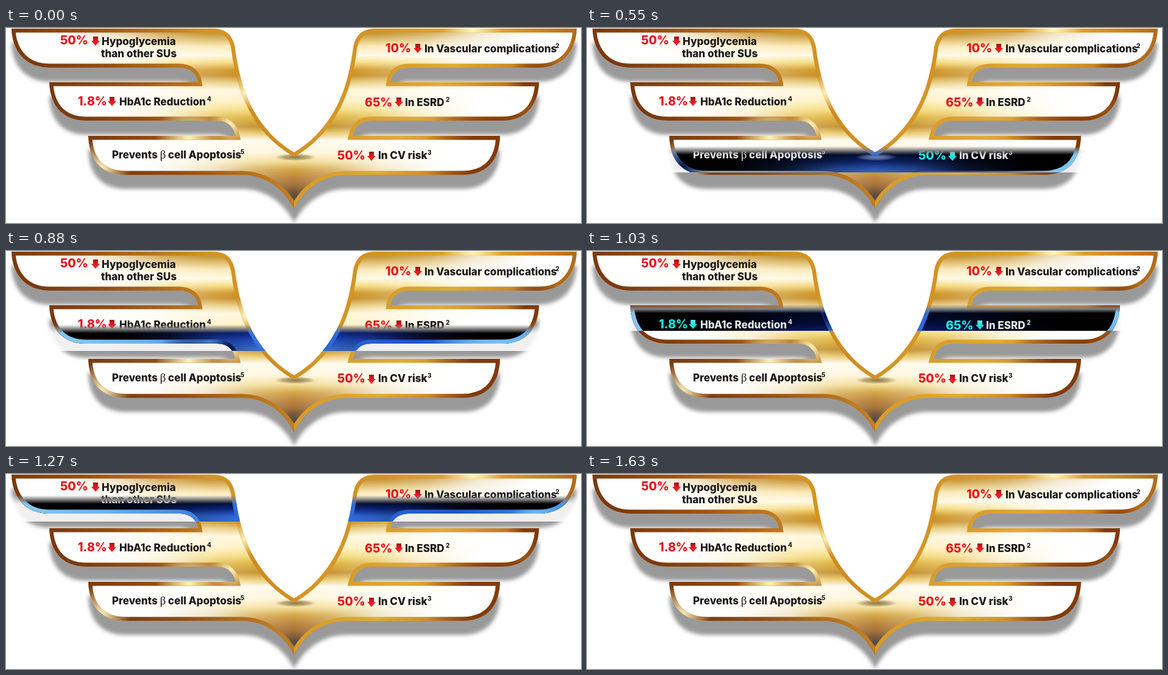
An HTML page that plays this animation: 944x320 px, repeating every 4.81 s.

```html
<!DOCTYPE html>
<html lang="en">
<head>
<meta charset="utf-8">
<title>Gold wings</title>
<style>
  html, body { margin: 0; width: 100%; height: 100%; overflow: hidden; background: #fff; }
  svg { position: absolute; left: 0; top: 0; }
  text { font: 800 17px Inter, sans-serif; fill: #1a1718; }
  .num { font-size: 19.5px; fill: #e8141c; }
  .sup { font-size: 10px; }
  .beta { font: 400 19px "Liberation Serif", serif; }
  #band {
    position: absolute; left: 0; top: 0; width: 944px; height: 320px; background: #fff;
    mask: linear-gradient(transparent, #000 14px) 0 -100px / 100% 43px no-repeat;
  }
  #band svg { filter: invert(1); }
</style>
</head>
<body>
<svg width="944" height="320">
  <defs>
    <path id="half" d="M473 297C457 264 426 241 386 241H197C152 241 136 212 135 177H377C374 164 366 152 346 152H132C88 152 72 122 71 89H315C313 75 303 65 283 65H72C28 65 10 34 9 1H338C362 1 372 12 376 32C384 100 408 165 473 204"/>
    <path id="arrow" d="M3 0H11V7H14L7 15L0 7H3Z" fill="url(#red)"/>
    <clipPath id="inside"><use href="#half"/></clipPath>

    <linearGradient id="red" x2="0" y2="1">
      <stop stop-color="#9c1218"/><stop offset=".6" stop-color="#ee1c24"/>
    </linearGradient>
    <linearGradient id="gold" gradientUnits="userSpaceOnUse" x1="0" y1="0" x2="0" y2="300">
      <stop offset=".03" stop-color="#c69634"/>
      <stop offset=".1" stop-color="#fbeab8"/>
      <stop offset=".15" stop-color="#fffae8"/>
      <stop offset=".19" stop-color="#f6dc85"/>
      <stop offset=".23" stop-color="#d19a2c"/>
      <stop offset=".26" stop-color="#c8902c"/>
      <stop offset=".3" stop-color="#ead083"/>
      <stop offset=".34" stop-color="#fff7de"/>
      <stop offset=".4" stop-color="#fff1c4"/>
      <stop offset=".45" stop-color="#f3da78"/>
      <stop offset=".49" stop-color="#dcb036"/>
      <stop offset=".54" stop-color="#c08b26"/>
      <stop offset=".575" stop-color="#e8c564"/>
      <stop offset=".615" stop-color="#fffaec"/>
      <stop offset=".68" stop-color="#fff6dc"/>
      <stop offset=".73" stop-color="#f3dc94"/>
      <stop offset=".775" stop-color="#cf9f3a"/>
      <stop offset=".82" stop-color="#b5772a"/>
      <stop offset=".86" stop-color="#955e20"/>
      <stop offset=".89" stop-color="#6a4018"/>
      <stop offset=".92" stop-color="#332a22"/>
    </linearGradient>
    <linearGradient id="pale" gradientUnits="userSpaceOnUse" x1="9" y1="1" x2="219" y2="-149">
      <stop offset=".2" stop-color="#fff"/>
      <stop offset=".5" stop-color="#fff" stop-opacity=".75"/>
      <stop offset=".75" stop-color="#fff" stop-opacity=".25"/>
      <stop offset="1" stop-color="#fff" stop-opacity="0"/>
    </linearGradient>
    <linearGradient id="rimLeft" gradientUnits="userSpaceOnUse" x1="9" y1="1" x2="219" y2="-149">
      <stop stop-color="#7a3a10"/>
      <stop offset=".35" stop-color="#934e14"/>
      <stop offset=".75" stop-color="#b9761f"/>
      <stop offset="1" stop-color="#d39325"/>
    </linearGradient>
    <linearGradient id="rimRight" gradientUnits="userSpaceOnUse" x1="9" y1="1" x2="219" y2="-149">
      <stop stop-color="#b26c1b"/>
      <stop offset=".2" stop-color="#cb8826"/>
      <stop offset=".5" stop-color="#e0ab34"/>
      <stop offset="1" stop-color="#d39325"/>
    </linearGradient>
    <radialGradient id="glowBar" gradientUnits="userSpaceOnUse" cx="300" cy="180" r="55">
      <stop stop-color="#fff3b8"/><stop offset="1" stop-color="#fff3b8" stop-opacity="0"/>
    </radialGradient>
    <radialGradient id="glowNotch" href="#glowBar" cx="368" cy="158" r="36"/>
    <radialGradient id="glowEnd" href="#glowBar" cx="156" cy="230" r="48"/>
    <radialGradient id="glowStem" href="#glowBar" cx="392" cy="106" r="30"/>
    <radialGradient id="glowTop" href="#glowBar" cx="180" cy="3" r="50"/>
    <radialGradient id="shadeLow" gradientUnits="userSpaceOnUse" cx="140" cy="205" r="120">
      <stop offset=".4" stop-color="#7f3b0e"/><stop offset="1" stop-color="#7f3b0e" stop-opacity="0"/>
    </radialGradient>
    <radialGradient id="shadeMid" href="#shadeLow" cx="75" cy="92" r="50"/>
    <radialGradient id="dark">
      <stop stop-color="#7d6a3c" stop-opacity=".9"/>
      <stop offset=".6" stop-color="#8a7540" stop-opacity=".55"/>
      <stop offset="1" stop-color="#8a7540" stop-opacity="0"/>
    </radialGradient>
    <filter id="soft" x="-5%" y="-5%" width="110%" height="115%"><feGaussianBlur stdDeviation="3"/></filter>

    <g id="body">
      <use href="#half" fill="url(#gold)"/>
      <use href="#half" fill="url(#pale)"/>
    </g>
    <g id="rim" clip-path="url(#inside)">
      <use href="#half" fill="none" stroke-width="13" stroke-linecap="square"/>
    </g>
  </defs>

  <g id="art">
    <g fill="#232323" opacity=".46" filter="url(#soft)" transform="translate(0 23)">
      <use href="#half"/>
      <use href="#half" transform="matrix(-1 0 0 1 946 0)"/>
    </g>
    <use href="#body"/>
    <use href="#body" transform="matrix(-1 0 0 1 946 0)"/>
    <ellipse cx="475" cy="212" rx="34" ry="6" fill="url(#dark)"/>
    <use href="#rim" stroke="url(#rimLeft)"/>
    <use href="#rim" stroke="url(#glowBar)"/>
    <use href="#rim" stroke="url(#glowNotch)"/>
    <use href="#rim" stroke="url(#glowEnd)"/>
    <use href="#rim" stroke="url(#glowStem)"/>
    <g transform="matrix(-1 0 0 1 946 0)">
      <use href="#rim" stroke="url(#rimRight)"/>
      <use href="#rim" stroke="url(#shadeLow)"/>
      <use href="#rim" stroke="url(#shadeMid)"/>
      <use href="#rim" stroke="url(#glowTop)"/>
    </g>

    <text class="num" x="89" y="27">50%</text>
    <use href="#arrow" x="140" y="14"/>
    <text x="157" y="28">Hypoglycemia</text>
    <text x="156" y="48">than other SUs</text>

    <text class="num" x="118" y="127">1.8%</text>
    <use href="#arrow" x="167" y="113"/>
    <text x="186" y="127">HbA1c Reduction</text>
    <text class="sup" x="330" y="120">4</text>

    <text x="174" y="214">Prevents <tspan class="beta">β</tspan> cell Apoptosis</text>
    <text class="sup" x="385" y="207">5</text>

    <text class="num" x="623" y="40">10%</text>
    <use href="#arrow" x="669" y="26"/>
    <text x="687" y="40">In Vascular complications</text>
    <text class="sup" x="902" y="33">2</text>

    <text class="num" x="589" y="129">65%</text>
    <use href="#arrow" x="638" y="114"/>
    <text x="655" y="128">In ESRD</text>
    <text class="sup" x="722" y="121">2</text>

    <text class="num" x="544" y="216">50%</text>
    <use href="#arrow" x="593" y="203"/>
    <text x="611" y="215">In CV risk</text>
    <text class="sup" x="692" y="208">3</text>
  </g>
</svg>
<div id="band"><svg width="944" height="320"><use href="#art"/></svg></div>
<script>
  const LOOP = 4810, START = 70, STEP = 30, RISE = 6.62;
  const band = document.getElementById('band');

  // The negative band climbs the stage once per loop, in even steps.
  function draw(now) {
    const t = now % LOOP;
    const step = Math.floor((t - START) / STEP);
    const top = step < 0 ? -100 : Math.max(300 - RISE * step, -100);
    band.style.maskPosition = `0 ${top}px`;
    requestAnimationFrame(draw);
  }
  requestAnimationFrame(draw);
</script>
</body>
</html>
```
